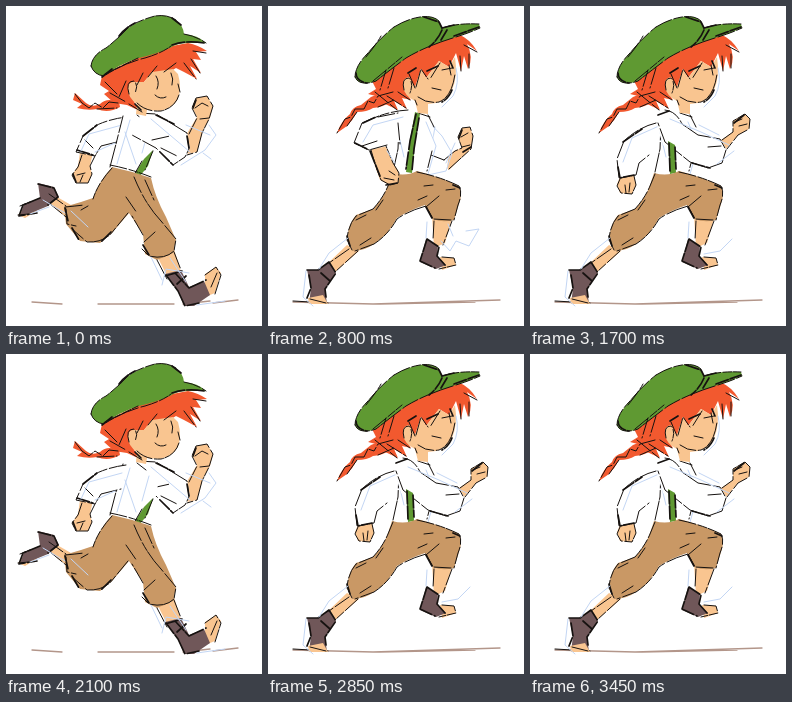
Animation, 256 px wide and 320 px high, one loop 3550 ms. Source, as an HTML page:

```html
<!DOCTYPE html>
<html lang="en">
<head>
<meta charset="utf-8">
<title>Running</title>
<style>
html, body { margin: 0; width: 100%; height: 100%; overflow: hidden; background: #fff; }
svg { display: block; width: 100vw; height: 100vh; }
path { stroke-linecap: round; stroke-linejoin: round; }
.pose { visibility: hidden; }
.pose.on { visibility: visible; }
.green { fill: #5f9932; }
.hair { fill: #f2592f; }
.skin { fill: #f9c590; }
.cloth { fill: #c99865; }
.boot { fill: #705759; }
.shirt { fill: #fff; }
.ink, .bold, .blue, .earth { fill: none; stroke: #161210; stroke-width: 1; }
.ink { stroke-dasharray: 17 2.5 9 1.5 25 3; }
.bold { stroke-width: 1.7; stroke-dasharray: 13 2 21 3; }
.blue { stroke: #c3d6f4; }
.earth { stroke: #b3968a; stroke-width: 1.3; }
</style>
</head>
<body>
<svg viewBox="0 0 256 320">
<defs>
  <!-- heads -->
  <g id="headLow">
    <path class="hair" d="M113 96Q101 91 94 98Q86 102 80 97L69 87L67 94L76 98L71 102Q82 105 91 103Q102 108 114 101Z"/>
    <path class="hair" d="M96 70Q120 54 166 40L182 37Q192 39 201 45L190 46L195 54L187 53L195 67L184 60L191 73L178 66L170 62L160 68L146 66L138 76L133 84L126 92L130 99L136 106L121 99L108 97L98 88L103 85L94 79Z"/>
    <path class="skin" d="M122 83Q122 74 131 76L138 76L146 66L167 63L172 68Q176 82 172 93Q167 102 154 105L141 104L140 110L130 108L131 98Q122 92 122 83Z"/>
    <path class="green" d="M85 60Q86 49 100 42Q113 32 122 22Q134 14 149 10Q161 8 170 14Q177 19 178 28Q192 29 200 37L182 37Q171 37 164 42Q150 48 133 52Q113 58 98 70Q88 69 85 60Z"/>
    <path class="ink" d="M123 88Q119 75 128 75Q133 79 129 87M131 97Q140 106 155 105Q169 102 173 89M172 78L174 86M149 89Q154 94 160 91M150 70Q154 76 151 83M165 67Q168 73 166 79M137 67L131 79M151 60L142 71M170 57L158 66M178 57L190 73M185 53L194 67M187 45L200 47M99 76L111 88M104 87L120 96M120 75L113 91M112 97L103 96L97 102L89 97L83 102L76 97L69 88M91 103L111 102M136 106L123 98"/>
    <path class="ink" d="M85 60Q86 49 100 42Q113 32 122 22M85 60Q88 69 98 70Q118 57 139 52Q156 47 165 40M122 21Q134 14 149 10Q161 8 170 14M178 28Q190 30 200 37M99 68L132 52"/>
    <path class="bold" d="M113 30Q119 22 129 17M166 39Q180 34 198 37M166 12L175 19M96 71L106 63M129 98L135 104"/>
  </g>
  <g id="headHigh">
    <path class="hair" d="M125 86Q111 87 103 91Q98 95 93 99Q84 101 82 108Q73 115 69 127L79 120Q85 114 89 106Q99 106 105 102Q116 101 126 94Z"/>
    <path class="hair" d="M104 75Q115 59 136 47Q160 33 190 28Q202 33 209 45L199 38Q206 51 200 63L196 50L193 65L188 47L181 61L171 55L158 72L153 63L147 81L140 71L136 83L143 94L134 92L139 103L126 95L130 104L115 97L103 98L112 91L100 88L108 83Z"/>
    <path class="skin" d="M135 80Q134 72 141 71L147 81L153 63L158 72L171 55L181 61L187 51Q190 70 184 84Q180 94 168 97L160 98L160 108L150 107L147 95Q136 90 135 80Z"/>
    <path class="green" d="M87 71Q87 60 100 47Q112 32 126 21Q139 13 152 11Q165 9 171 15L174 22Q186 17 211 18L212 22Q201 27 188 31Q158 40 138 52Q122 64 108 75Q91 81 87 71Z"/>
    <path class="ink" d="M136 84Q133 72 141 72Q146 77 142 87M147 94L149 99M150 91Q159 98 171 96Q184 91 187 68M164 82L173 84M147 82L141 68M148 81L153 63L160 73M172 57L162 73M181 59L183 69M192 50L193 65M196 39L209 46M201 48L201 62M174 64L184 62M118 64L112 84M126 62L120 82M107 86L129 104M119 90L138 102M130 86L142 94M125 86L110 90L106 97L100 95L96 103L87 103L83 111L77 113L69 127M79 120L89 106M110 101L126 94"/>
    <path class="ink" d="M87 71Q87 60 100 47Q112 32 126 21M87 71Q91 81 108 75Q122 64 138 52Q158 40 188 31Q201 27 212 22M126 21Q139 13 152 11Q165 9 171 15M174 22Q188 17 211 18M105 75L134 51M98 51Q108 39 113 30"/>
    <path class="bold" d="M174 22L186 19M186 30L211 21M174 24Q170 34 161 41M179 24L173 34M88 67Q88 75 99 77M156 11L171 16L174 22M140 67L148 62M159 65L170 60M182 55L185 62M184 84Q181 92 174 96"/>
    <path class="blue" d="M188 62Q192 77 185 90L174 101"/>
  </g>

  <!-- legs -->
  <g id="legsLand">
    <path class="skin" d="M46 188L65 199L59 210L43 197ZM151 250L168 243L175 266L162 272ZM199 268L210 261L215 267L209 287L199 291ZM12 209L23 196L31 205L19 212Z"/>
    <path class="boot" d="M32 177L48 181L53 191L42 200L25 207L14 210L18 198L34 192ZM159 268L175 264L183 281L198 275L204 289L188 300L178 300L172 285Z"/>
    <path class="cloth" d="M106 161Q125 165 145 172Q149 191 160 211L170 234L167 247L151 254L139 248L137 228L123 207L106 227L94 237L74 235L60 218L58 201L75 196L87 192Q92 177 106 161Z"/>
    <path class="ink" d="M106 162Q92 177 87 193M122 207L108 224Q99 237 81 236L66 223M59 201Q70 200 78 199M60 203L61 218L70 220M75 204L82 200M128 171Q139 198 155 215L170 233L168 245Q159 254 143 250L136 243M137 229L126 210M120 191L131 207M139 174L148 194M138 236L149 226M43 188L60 200M43 197L60 211M151 254L161 273M168 246L175 264M199 269L210 261L215 269L209 288M211 267L205 281M14 200L24 196M12 209L23 208"/>
    <path class="bold" d="M32 178L48 182L52 191L42 199M34 192L17 199L13 210L31 207M59 202L62 215M66 222L73 234M160 269L172 285L179 300L193 297M169 267L183 282L200 274M159 270L176 265M171 278L180 270M137 239L143 249M105 226L95 236"/>
    <path class="blue" d="M37 194L59 207M24 208L43 201M65 205L82 221M145 251L156 274M164 252L180 276M156 279L160 263L183 267M191 299L219 295"/>
  </g>
  <g id="legsPass">
    <path class="skin" d="M123 250L140 249L139 274L125 276ZM83 236L99 229L88 250L76 248ZM144 290L160 286L164 295L147 299ZM61 266L69 259L76 266L67 274Z"/>
    <path class="boot" d="M121 270L140 270L142 284L154 290L154 299L121 299ZM68 239L87 246L82 259L74 270L63 268L70 255Z"/>
    <path class="cloth" d="M110 164L148 168Q162 181 168 191L178 211L171 225L149 226L145 248Q134 255 122 254L115 240L120 215L100 237L80 237L79 218L96 204Z"/>
    <path class="ink" d="M110 164L96 204L81 217L80 235M148 169Q168 188 178 211L170 225L151 225M149 222L145 248Q134 255 122 253L116 241M121 215L101 236L80 237M121 214L139 207M127 204L149 212M134 171L143 185M123 254L124 272M141 250L140 269M98 231L87 249M154 290L163 289L165 296M70 256L62 266L67 274L77 265"/>
    <path class="bold" d="M121 271L140 271L143 285L155 290M121 271L121 299L154 299M68 240L87 247L81 260L73 270M69 241L70 256M116 237L122 252M80 222L80 234"/>
    <path class="blue" d="M86 237L70 249M145 252L149 277M119 258L116 281L130 300M93 250L80 270"/>
  </g>
  <g id="legsPush">
    <path class="skin" d="M79 239L91 245L67 266L58 259ZM164 210L185 209L177 237L166 242ZM172 251L186 252L188 259L174 264Z"/>
    <path class="boot" d="M39 264L50 264L61 256L68 267L57 283L59 298L41 298L43 282ZM158 233L170 240L169 250L178 259L168 263L152 256Z"/>
    <path class="skin" d="M40 292L55 289L60 298L41 298Z"/>
    <path class="cloth" d="M124 167Q138 171 149 165Q172 171 191 180Q195 187 191 198L186 214Q174 217 165 213L157 199Q142 204 129 212Q121 228 106 238Q96 245 85 245L79 234Q80 218 88 209L105 203Q116 191 120 179Z"/>
    <path class="ink" d="M125 168L120 180Q115 192 105 203L88 210Q80 219 79 234L84 244M149 166Q173 171 191 180Q195 187 190 199L186 214M183 214L165 213L158 200Q140 205 129 213Q120 229 106 238L87 245M158 201L171 190M115 194L108 204M88 214L98 209M92 239L103 232M156 180L165 179M150 194L159 190M178 184L187 183M81 243L61 257M90 245L67 266M166 215L165 234M184 215L175 239M174 251L186 252L188 259L171 263M42 293L58 297"/>
    <path class="bold" d="M39 264L50 264L61 256L68 267L57 283L58 291M41 269L43 282L39 292M53 267L62 275M159 233L171 241L169 250L177 259M159 233L152 255L167 262M79 230L82 240M158 201L164 212M185 179L192 182"/>
    <path class="blue" d="M80 232L61 247L51 263M38 265L35 291L45 300M159 216L158 232"/>
  </g>

  <!-- torso and arms -->
  <g id="torsoLow">
    <path class="shirt" d="M116 109L137 105L153 125L145 169L104 162L111 137Z"/>
    <path class="green" d="M128 169L138 153L147 144L142 160L134 170Z"/>
    <path class="ink" d="M117 110L110 138L104 161M104 159Q125 163 145 171M136 155L128 169M147 145L139 164M131 109L140 116"/>
    <path class="blue" d="M124 114L111 158M143 122L136 147M119 126L130 158"/>
  </g>
  <g id="torsoHigh">
    <path class="shirt" d="M128 107L151 103L164 116L166 139L158 168L124 166L130 143Z"/>
    <path class="ink" d="M131 117L130 143L125 166M160 109L166 121M150 107L162 111M164 145L159 165"/>
    <path class="blue" d="M158 116L168 140L160 168M128 118L136 151"/>
  </g>
  <g id="backArmLow">
    <path class="skin" d="M74 146L88 142L84 160L86 168L82 177L70 177L66 169L72 160Z"/>
    <path class="shirt" d="M119 111L96 116L77 130L70 146L89 150L94 140L115 135Z"/>
    <path class="ink" d="M120 111Q104 113 91 119L77 130L70 146L89 150L95 140L115 135M79 134L87 142M76 149L72 161L66 169L70 177L82 177L86 168L84 160L89 150M71 169L79 167M74 176L77 169"/>
    <path class="bold" d="M77 130L91 119M71 144L87 149M67 168L70 176"/>
    <path class="blue" d="M116 119L83 128L75 145M109 137L89 146"/>
  </g>
  <g id="frontArmLow">
    <path class="skin" d="M180 129L191 111L186 101L190 92L201 90L207 100L204 112L197 124L191 146L181 148Z"/>
    <path class="shirt" d="M134 107L151 108L181 126L184 142L180 151L167 160L149 143L130 132Z"/>
    <path class="ink" d="M132 107L150 108L181 127L183 143L179 151L167 159L150 142L126 129M146 134L164 130M155 142L171 150M183 128L191 112L186 102L190 92L201 90L207 100L203 113L196 127L191 146L181 149M189 102L196 97L202 100M194 113L203 112"/>
    <path class="bold" d="M150 109L168 118M154 146L167 159M187 102L190 94M181 130L183 142"/>
    <path class="blue" d="M203 119L210 129L199 144L175 159M180 119L204 129M145 113L184 146M197 147L205 153"/>
  </g>
  <g id="farArmBack">
    <path class="skin" d="M90 171L104 169L106 179L102 188L90 187L87 178Z"/>
    <path class="shirt" d="M133 115L106 124L92 136L87 154L89 172L106 169L109 157L131 145Z"/>
    <path class="ink" d="M126 117Q109 121 94 135L87 153L89 172L106 169L109 157L119 149M90 173L87 180L91 187L102 188L106 179L104 170M95 179L96 187M100 177L99 186"/>
    <path class="bold" d="M93 136L112 123M88 161L90 172L104 169"/>
    <path class="blue" d="M129 120L102 132L93 156"/>
  </g>
  <g id="nearArmForward">
    <path class="skin" d="M191 134L203 126L203 115L215 108L220 113L219 123L208 129L196 143Z"/>
    <path class="shirt" d="M134 103L151 117L167 129L190 132L196 143L194 155L180 162L160 157L133 139L127 119Z"/>
    <path class="ink" d="M135 104Q146 105 152 118L168 129L190 133L196 144L192 157L178 162L160 156L135 136L128 117M178 141L191 140M192 134L203 126L203 115L215 108L220 113L219 123L208 129L197 143M205 116L212 113M209 120L217 118"/>
    <path class="bold" d="M128 109L139 105M162 157L180 162M204 117L214 109"/>
    <path class="blue" d="M140 113L171 126L199 139M169 119L189 129M187 158L204 145"/>
  </g>
  <g id="farArmForward">
    <path class="skin" d="M174 157L186 145L194 142L190 131L194 122L202 121L205 130L203 143L192 153L181 164Z"/>
    <path class="shirt" d="M154 110L169 124L181 146L179 163L163 169L153 148Z"/>
    <path class="ink" d="M176 154L187 145L194 142L190 131L194 122L202 121L205 130L203 143L192 153L181 163M193 131L200 127M194 141L202 139M163 149L176 154"/>
    <path class="bold" d="M191 132L194 124M195 146L203 141"/>
    <path class="blue" d="M156 111L174 130L184 147L178 165L160 169M187 137L178 157M167 121L163 143"/>
  </g>
  <g id="nearArmBack">
    <path class="skin" d="M102 140L117 139L125 157L131 166L130 177L121 179L112 174L107 160Z"/>
    <path class="shirt" d="M139 104L112 107L93 118L86 137L101 144L120 140L135 133Z"/>
    <path class="ink" d="M140 104Q119 105 94 117L86 137L101 144L119 139M130 117L132 138M94 140L109 135M103 144L108 161L113 174L122 179L130 177L131 167L125 157L118 140M121 165L127 169M116 172L126 174M110 111L130 107"/>
    <path class="bold" d="M95 117L108 111M102 145L112 170M118 179L129 177M87 137L99 143"/>
    <path class="blue" d="M135 111L105 119L95 136M119 145L127 157"/>
  </g>

  <!-- ground -->
  <g id="groundLand">
    <path class="earth" d="M26 296L56 298M92 298L168 298M177 298L204 295M207 297L232 294"/>
  </g>
  <g id="groundPush">
    <path class="earth" d="M25 296L105 298L232 294M112 298L207 296"/>
    <path class="ink" d="M25 295L60 297"/>
  </g>
</defs>

<g class="pose">
  <use href="#groundLand"/><use href="#backArmLow"/><use href="#torsoLow"/>
  <use href="#legsLand"/><use href="#frontArmLow"/><use href="#headLow"/>
</g>
<g class="pose">
  <use href="#groundPush"/><use href="#backArmLow" x="7" y="4"/><use href="#torsoLow" x="3" y="3"/>
  <use href="#legsPass"/><use href="#frontArmLow" x="-2" y="8"/><use href="#headLow" x="2" y="4"/>
</g>
<g class="pose">
  <use href="#groundPush"/><use href="#farArmForward"/><use href="#torsoHigh"/>
  <path class="green" d="M147 106L152 108L147 138L144 167L138 166L142 134Z"/>
  <path class="bold" d="M148 108L142 135L138 163M151 112L146 143L144 165"/>
  <use href="#legsPush"/><use href="#nearArmBack"/><use href="#headHigh"/>
  <path class="blue" d="M173 235L182 245L188 235L201 240L211 223L198 225M180 218L185 230"/>
</g>
<g class="pose">
  <use href="#groundLand"/><use href="#frontArmLow"/><use href="#torsoLow"/>
  <use href="#legsLand"/><use href="#backArmLow"/><use href="#headLow"/>
</g>
<g class="pose">
  <use href="#groundPush"/><use href="#farArmForward" x="-6" y="3"/><use href="#torsoLow" x="3" y="3"/>
  <use href="#legsPass"/><use href="#nearArmBack" x="-11" y="6"/><use href="#headLow" x="2" y="4"/>
</g>
<g class="pose">
  <use href="#groundPush"/><use href="#farArmBack"/><use href="#torsoHigh"/>
  <use href="#nearArmForward"/>
  <path class="green" d="M138 135L145 139L146 167L140 168Z"/>
  <path class="bold" d="M139 137L140 165M145 141L146 163"/>
  <use href="#legsPush"/><use href="#headHigh"/>
  <path class="blue" d="M174 248L190 245L202 233"/>
</g>
</svg>
<script>
const LOOP = 3550, STEP = 100, CUT = 2350;
const poses = [...document.querySelectorAll('.pose')];
const start = performance.now();

// One drawing is held for half a step, just before CUT.
function stepAt(t) {
  return t < CUT ? Math.floor(t / STEP) : 24 + Math.floor((t - CUT) / STEP);
}

function draw() {
  const now = stepAt((performance.now() - start) % LOOP) % poses.length;
  poses.forEach((pose, i) => pose.classList.toggle('on', i === now));
  requestAnimationFrame(draw);
}
draw();
</script>
</body>
</html>
```
